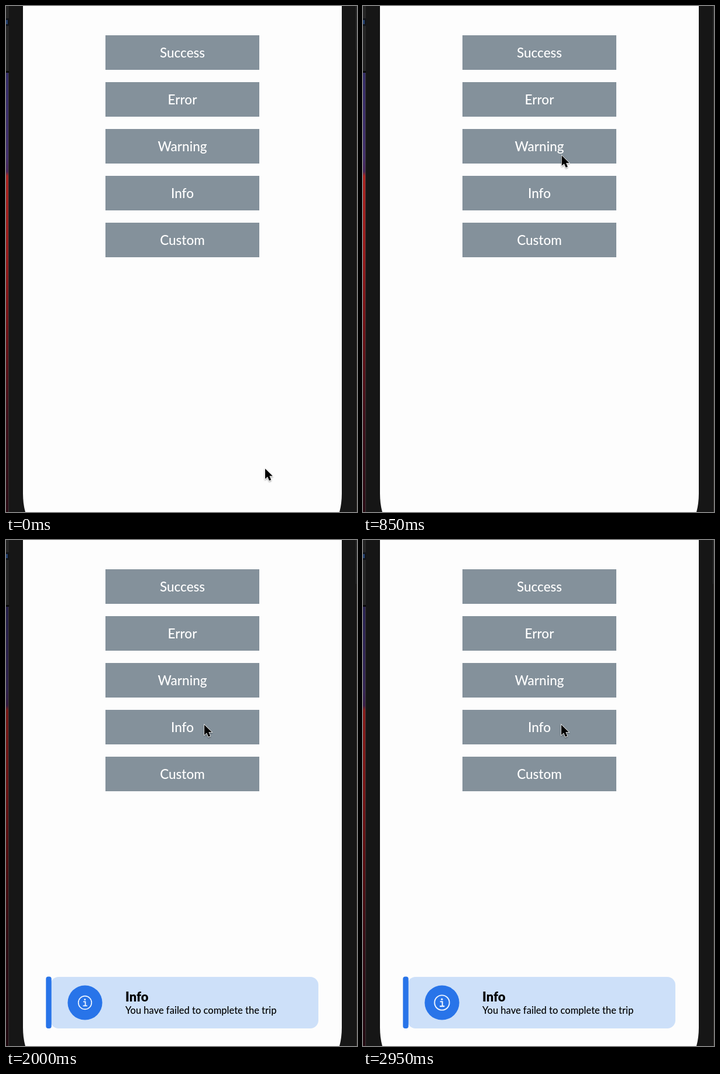
An HTML page for the animation above (3 s loop, 600x864 px).

```html
<!DOCTYPE html>
<html lang="en">
<head>
<meta charset="utf-8">
<style>
  html, body { margin: 0; width: 100%; height: 100%; overflow: hidden; background: #161616; }
  svg { display: block; width: 600px; height: 864px; }
  text { font-family: Lato, "Open Sans", sans-serif; }
  .label { font-size: 22.5px; font-weight: 500; fill: #fff; text-anchor: middle; }
  .title { font-size: 22px; font-weight: 900; }
  .message { font-size: 16.5px; font-weight: 500; }
</style>
</head>
<body>
<svg viewBox="0 0 600 864">
  <defs>
    <linearGradient id="wall" x1="0" y1="0" x2="0" y2="1">
      <stop offset="0" stop-color="#342d68"/>
      <stop offset=".19" stop-color="#42306c"/>
      <stop offset=".225" stop-color="#49265a"/>
      <stop offset=".235" stop-color="#a92420"/>
      <stop offset=".42" stop-color="#961b1b"/>
      <stop offset=".58" stop-color="#711216"/>
      <stop offset=".78" stop-color="#40101a"/>
      <stop offset="1" stop-color="#2a0b14"/>
    </linearGradient>
    <filter id="shadow" x="-50%" y="-50%" width="200%" height="200%">
      <feDropShadow dx="0" dy="1.5" stdDeviation="1.3" flood-opacity=".4"/>
    </filter>
  </defs>

  <!-- desktop behind the phone -->
  <rect width="600" height="864" fill="#161616"/>
  <rect width="5" height="112" fill="#252525"/>
  <rect y="21" width="5" height="13" fill="#101318"/>
  <rect y="24" width="3" height="7" fill="#23406f"/>
  <rect y="111" width="5" height="3" fill="#090909"/>
  <rect y="114" width="4" height="750" fill="url(#wall)"/>
  <rect id="dim" y="114" width="4" height="750"/>
  <rect x="4" y="114" width="1" height="750" fill="#393536"/>
  <rect x="598" width="2" height="75" fill="#2b2b2b"/>
  <rect x="599" y="75" width="1" height="789" fill="#38322f"/>

  <path d="M29 0H574V832Q574 850 570 864H33Q29 850 29 832Z" fill="#fdfdfd"/>
  <g id="buttons"></g>

  <g id="toast">
    <rect x="76" y="746" width="458" height="88" rx="14" fill="#cde0f9"/>
    <rect x="68.3" y="745.5" width="9.4" height="88.5" rx="4" fill="#2874e9"/>
    <circle cx="135" cy="790" r="29.6" fill="#2874e9"/>
    <g id="icon" fill="none" stroke="#eef5ff">
      <circle r=".93" stroke-width=".14"/>
      <path d="M-.24-.13H.05V.43M-.28.45H.32" stroke-width=".15"/>
      <circle cx="-.01" cy="-.43" r=".12" fill="#eef5ff" stroke="none"/>
    </g>
    <text class="title" x="204" y="788">Info</text>
    <text class="message" x="204" y="809">You have failed to complete the trip</text>
  </g>

  <path id="cursor" d="M0 0V17.5L4.1 13.8 7 20.5 10.2 19.1 7.4 12.6H12.8Z" fill="#000"
    stroke="#fff" stroke-width="1.4" paint-order="stroke" filter="url(#shadow)"/>
</svg>
<script>
const el = id => document.getElementById(id);
const LOOP = 3000, TOAST_AT = 1550;

el('buttons').innerHTML = ['Success', 'Error', 'Warning', 'Info', 'Custom'].map((name, i) =>
  `<rect x="170" y="${50 + 80 * i}" width="263" height="59" fill="#84919b"/>
   <text class="label" x="301.5" y="${88.3 + 80 * i}">${name}</text>`).join('');
const infoLabel = document.querySelectorAll('.label')[3];

// Eased interpolation through [time, value] stops
function track(t, stops) {
  const next = stops.findIndex(s => s[0] > t);
  if (next === 0) return stops[0][1];
  if (next < 0) return stops[stops.length - 1][1];
  const [t0, a] = stops[next - 1], [t1, b] = stops[next];
  const k = (t - t0) / (t1 - t0);
  return a + (b - a) * k * k * (3 - 2 * k);
}

function draw(t) {
  const x = track(t, [[0, 443], [500, 340.5], [600, 340.5], [1100, 339]]);
  const y = track(t, [[0, 790], [500, 194.5], [600, 194.5], [1100, 315.5]]);
  el('cursor').setAttribute('transform', `translate(${x} ${y})`);

  infoLabel.setAttribute('opacity', track(t, [[1380, 1], [1520, .2], [1620, .2], [1850, 1]]));
  el('dim').setAttribute('opacity', track(t, [[1400, 0], [1600, .3], [2100, .3], [2600, .2]]));

  el('toast').style.display = t < TOAST_AT ? 'none' : '';
  const r = 12.6 - 2.4 * Math.cos(Math.PI * (t - TOAST_AT) / 1030);
  el('icon').setAttribute('transform', `translate(135 790) scale(${r})`);
}

const start = performance.now();
function tick() {
  draw((performance.now() - start) % LOOP);
  requestAnimationFrame(tick);
}
tick();
</script>
</body>
</html>
```
